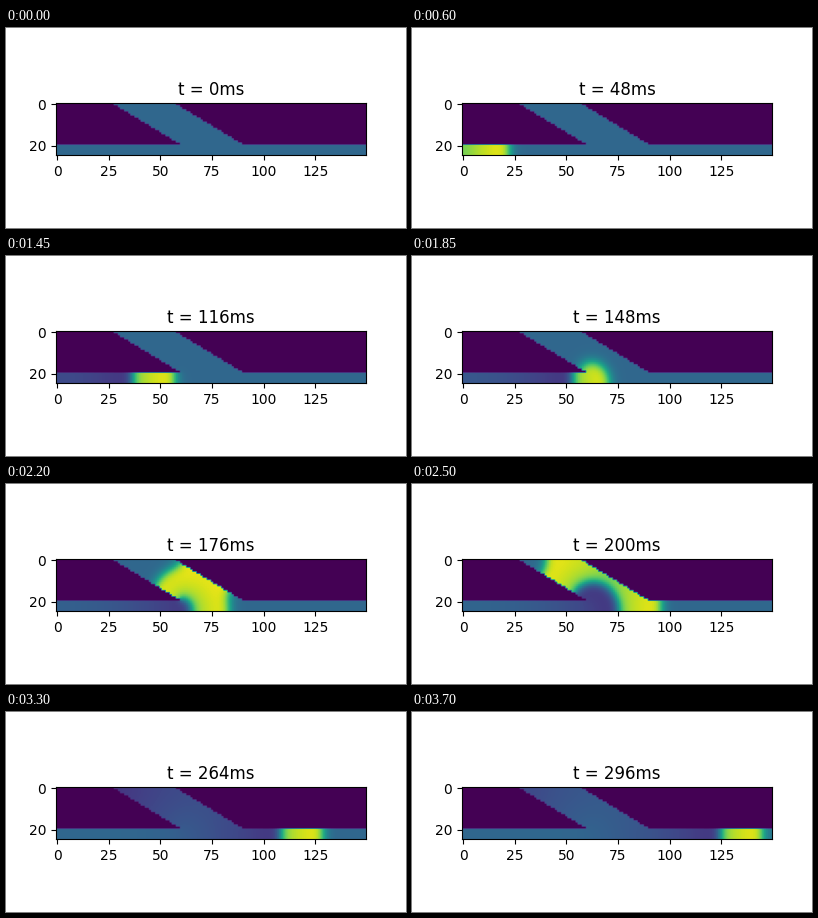
A matplotlib script for the animation above (3.75 s loop, 400x200 px).

```python
import numpy as np
import matplotlib.pyplot as plt
from matplotlib.animation import FuncAnimation

ROWS, COLS = 25, 150
FRAMES, INTERVAL = 75, 50
MS_PER_FRAME = 4
DT = 0.1

# FitzHugh-Nagumo parameters
ALPHA, BETA, GAMMA, EPS, DIFF = 0.1, 0.5, 1.0, 0.01, 1.0
STIM_COLS, STIM_MS, STIM = 2, 15, 0.1
U_MIN, U_MAX = -0.5, 1.0


def make_tissue():
    """A straight channel along the bottom with a slanted side branch."""
    y, x = np.mgrid[:ROWS, :COLS]
    left = np.round(28 + y * 5 / 3)
    branch = (x >= left) & (x < left + 30)
    return branch | (y >= 20)


def shifted(a):
    """The four neighbours of every cell."""
    p = np.pad(a, 1)
    return p[:-2, 1:-1], p[2:, 1:-1], p[1:-1, :-2], p[1:-1, 2:]


def simulate(tissue):
    """Potential at each displayed time, with no flux through the walls."""
    degree = sum(shifted(tissue.astype(float)))
    u = np.zeros(tissue.shape)
    w = np.zeros(tissue.shape)
    stim = np.zeros(tissue.shape)
    stim[20:, :STIM_COLS] = STIM
    steps = round(MS_PER_FRAME / DT)
    states = []
    for n in range(FRAMES * steps):
        if n % steps == 0:
            states.append(np.where(tissue, u, U_MIN))
        lap = sum(shifted(u)) - degree * u
        du = DIFF * lap + u * (1 - u) * (u - ALPHA) - w
        if n * DT < STIM_MS:
            du += stim
        dw = EPS * (BETA * u - GAMMA * w)
        u = np.where(tissue, u + DT * du, 0)
        w = np.where(tissue, w + DT * dw, 0)
    return states


states = simulate(make_tissue())

fig, ax = plt.subplots(figsize=(4, 2), dpi=100)
image = ax.imshow(states[0], cmap="viridis", vmin=U_MIN, vmax=U_MAX)
title = ax.set_title("t = 0ms")


def update(i):
    image.set_data(states[i])
    title.set_text(f"t = {i * MS_PER_FRAME}ms")
    return image, title


anim = FuncAnimation(fig, update, frames=FRAMES, interval=INTERVAL,
                     repeat=True, repeat_delay=0)
plt.show()
```
